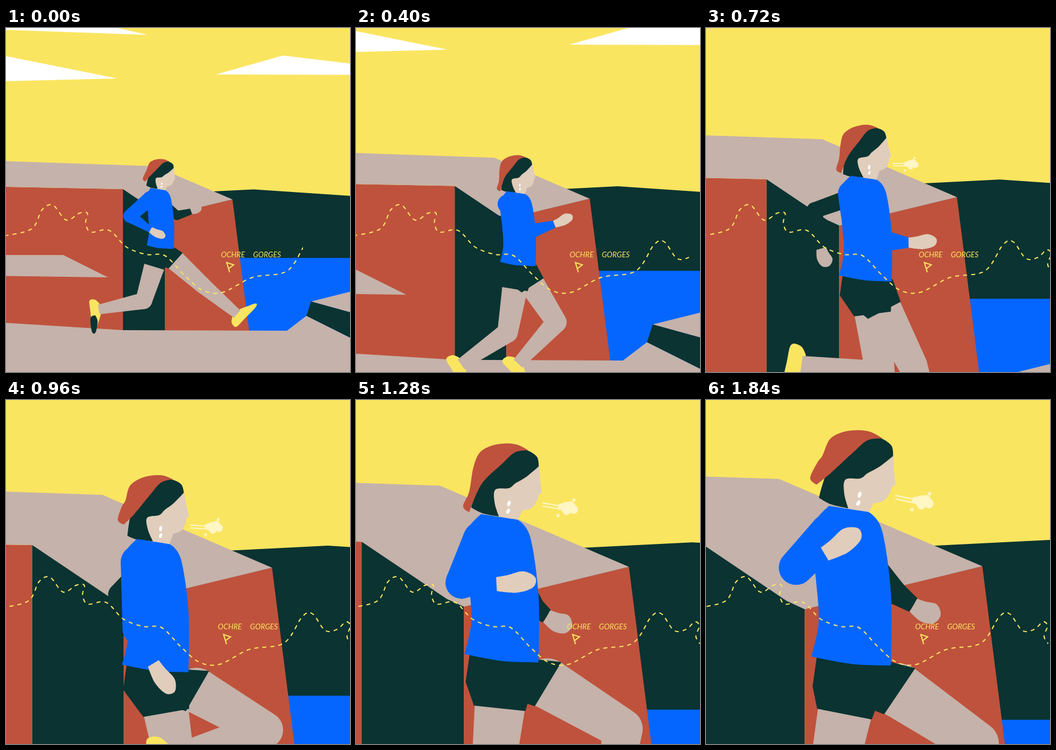
These frames come from a looping animation (600x600 px, 1.88 s). An HTML page with a canvas:

```html
<!DOCTYPE html>
<html lang="en">
<head>
<meta charset="utf-8">
<title>Trail runner</title>
<style>
html, body { margin: 0; width: 100%; height: 100%; overflow: hidden; background: #fae560; }
canvas { display: block; }
</style>
</head>
<body>
<canvas id="stage" width="600" height="600"></canvas>
<script>
const ctx = document.getElementById('stage').getContext('2d');
const YELLOW = '#fae560', WHITE = '#fff', TAN = '#c5b2aa', RED = '#bf523c',
  DARK = '#0a3331', BLUE = '#0466ff', SKIN = '#e0cdbb', BREATH = '#fff6c4';
const LOOP = 1880, STEP = 80;
const RAD = Math.PI / 180;

// Steps at which the key poses are reached, and the tracks through them
const KEYS = [0, 3, 7, 12, 16, 20, 23];
const zoomTrack = [1, 1.085, 1.44, 2.19, 2.44, 2.56, 2.625];
const cliffX = [395, 399, 420, 464, 476, 481.5, 482];
const neckX = [265, 270, 284, 257, 250, 251, 249];
const neckY = [281, 300, 270, 247, 204, 192, 190];
const tilt = [-3, -8, -11, -8, -2, 0, 0];
// Limb angles in degrees: 0 hangs down, positive swings forward
const near = { thigh: [48, 16, -20, 60, 59, 57, 56], shin: [50, -3, -95, -74, -8, 0, 0] };
const far = { thigh: [-17, 22, 35, 10, -6, -9, -11], shin: [-79, -104, 16, -3, -4, -4, -4] };
// Elbow and wrist, measured from the neck
near.arm = [[-49, -13, 29, -13, -27, -32, -35], [47, 57, 57, 70, 47, 42, 39],
  [-13, 27, 67, 0, -2, -12, -16], [71, 55, 43, 97, 48, 35, 30]];
far.arm = [[33, 14, -50, -28, 24, 29, 30], [46, 65, 33, 42, 64, 58, 55],
  [58, 30, -45, -16, 34, 41, 43], [39, 72, 76, 63, 71, 66, 64]];

// Smooth interpolation through a track
function at(track, step) {
  let k = 0;
  while (k < KEYS.length - 2 && step >= KEYS[k + 1]) k++;
  const span = KEYS[k + 1] - KEYS[k], u = (step - KEYS[k]) / span;
  const slope = i => {
    const a = Math.max(0, i - 1), b = Math.min(KEYS.length - 1, i + 1);
    return (track[b] - track[a]) / (KEYS[b] - KEYS[a]) * span;
  };
  const u2 = u * u, u3 = u2 * u;
  return track[k] + (track[k + 1] - track[k]) * (3 * u2 - 2 * u3) +
    slope(k) * (u3 - 2 * u2 + u) + slope(k + 1) * (u3 - u2);
}

// Curve through points; those whose index is in `sharp` are corners
function trace(p, sharp = '', closed = true) {
  const n = p.length / 2;
  const point = i => {
    i = closed ? (i + n) % n : Math.min(n - 1, Math.max(0, i));
    return [p[2 * i], p[2 * i + 1]];
  };
  const handle = (i, dir) => {
    const [x, y] = point(i), a = point(i - 1), b = point(i + 1);
    const pull = sharp.includes((i + n) % n) ? 0 : dir / 6;
    return [x + pull * (b[0] - a[0]), y + pull * (b[1] - a[1])];
  };
  ctx.beginPath();
  ctx.moveTo(...point(0));
  for (let i = 0; i < (closed ? n : n - 1); i++)
    ctx.bezierCurveTo(...handle(i, 1), ...handle(i + 1, -1), ...point(i + 1));
}

function blob(fill, p, sharp) {
  trace(p, sharp);
  ctx.fillStyle = fill;
  ctx.fill();
}

function poly(fill, ...p) {
  ctx.beginPath();
  for (let i = 0; i < p.length; i += 2) ctx.lineTo(p[i], p[i + 1]);
  ctx.fillStyle = fill;
  ctx.fill();
}

function dot(fill, x, y, rx, ry = rx, turn = 0) {
  ctx.beginPath();
  ctx.ellipse(x, y, rx, ry, turn, 0, 7);
  ctx.fillStyle = fill;
  ctx.fill();
}

function within(x, y, scale, turn, draw) {
  ctx.save();
  ctx.translate(x, y);
  ctx.rotate(turn);
  ctx.scale(scale, scale);
  draw();
  ctx.restore();
}

// Tapered limb through [x, y, radius] joints, cut straight at the end
function limb(fill, ...joints) {
  for (let i = 0; i < joints.length - 1; i++) {
    const [x, y, r] = joints[i], [x2, y2, r2] = joints[i + 1];
    const len = Math.hypot(x2 - x, y2 - y), nx = (y - y2) / len, ny = (x2 - x) / len;
    dot(fill, x, y, r);
    poly(fill, x + nx * r, y + ny * r, x2 + nx * r2, y2 + ny * r2,
      x2 - nx * r2, y2 - ny * r2, x - nx * r, y - ny * r);
  }
}

// Drawn around the tip of the cliff; the near rocks also drift to the left
function landscape(step, zoom) {
  const rock = -9.6 * step, ledge = -8.5 * step, hill = -14 / zoom;
  poly(WHITE, -400, -300, -200, -299, -148, -287, -400, -296);
  poly(WHITE, -400, -251, -201, -211, -400, -206);
  poly(WHITE, -29, -218, 88, -251, 280, -228, 280, -217);
  poly(DARK, hill - 60, -12, hill + 51, -17.6, hill + 340, 2, hill + 340, 110, hill - 60, 110);
  poly(BLUE, 0, 102, 320, 102, 320, 260, 0, 260);
  poly(RED, -400, -22, -191, -18, -191, 230, -400, 230);
  poly(DARK, -191, -18, -118, 20, -118, 230, -191, 230);
  poly(RED, 0, 0, 29, 229, -118, 229, -118, 28);
  poly(TAN, -400, -67, -135, -58, 0, 0, -118, 28.5, -130, 23, -191, -18, -400, -22);
  poly(TAN, -500, 97, ledge - 295, 97, ledge - 217, 136, -500, 132);
  poly(TAN, -400, 215, -191, 228, rock + 95, 229, rock + 129, 203, rock + 329, 303, 400, 500, -400, 500);
  poly(TAN, rock + 137, 178, rock + 337, 128, rock + 337, 233);
  poly(DARK, rock + 137, 178, rock + 337, 233, rock + 329, 303, rock + 129, 203);
}

const HIP = [4, 101];

function reach([x, y], degrees, length) {
  return [x + length * Math.sin(degrees * RAD), y + length * Math.cos(degrees * RAD)];
}

function leg(side, step) {
  const thigh = at(side.thigh, step), shin = at(side.shin, step);
  const hem = reach(HIP, thigh, 35), knee = reach(HIP, thigh, 98), ankle = reach(knee, shin, 80);
  within(...ankle, 1, -shin * RAD, () => {
    blob(YELLOW, [-10,-3, -18,3, -18,13, 0,15, 30,17, 35,13, 22,5, 9,-2], '07');
    if (side === far && step < 2) blob(DARK, [9,8, 20,6, 38,13, 36,19, 12,17], '0');
  });
  limb(TAN, [...hem, 18], [...knee, 14.5], [...ankle, 8.5]);
}

function shorts(side, step) {
  const thigh = at(side.thigh, step), hem = reach(HIP, thigh, 36);
  poly(DARK, -21, 97, 29, 102, ...reach(hem, thigh + 90, 18.5), ...reach(hem, thigh - 90, 18.5), -24, 118);
}

function arm(side, step, shoulder, radii, sleeve, skin, length) {
  const [ex, ey, wx, wy] = side.arm.map(track => at(track, step));
  limb(sleeve, [...shoulder, radii[0]], [ex, ey, radii[1]], [wx, wy, 5.2]);
  within(wx, wy, 1, Math.atan2(wy - ey, wx - ex) - 0.1, () => blob(skin,
    [0,-5, length * 0.3,-6, length * 0.7,-8, length,-3, length * 0.92,4, length * 0.5,7, 0,5], '06'));
}

// Drawn around the tip of the nose
function head(step) {
  const tail = 5 + 18 * Math.sin((step - 4) * 0.6);
  blob(SKIN, [-3,-52, -2,-20, 0,0, -6,4, -9,13, -20,27, -37,31, -48,52, -65,60, -90,40, -92,-20, -45,-50], '0267');
  blob(DARK, [-4,-49, -7,-67, -27,-80, -52,-81, -107,-40, -130,22, -110,33, -80,40, -87,15,
    -85,-9, -60,-11, -47,-20, -27,-31], '057');
  blob(RED, [-22,-79, -42,-90, -67,-93, -92,-89, -112,-77, -124,-50, -133,tail - 26, -145,tail,
    -134,tail + 11, -110,-20, -72,-55, -47,-76], '08');
  dot(WHITE, -61, 17, 3, 5.5, 0.3);
  dot(WHITE, -63, 31, 3, 5, 0.5);
  if (step < 9) return;
  ctx.strokeStyle = BREATH;
  ctx.lineWidth = 2.4;
  ctx.beginPath();
  for (const y of [18, 24]) {
    ctx.moveTo(0, y);
    ctx.lineTo(34, y + 7);
  }
  ctx.stroke();
  for (const [x, y, r] of [[43, 28, 10], [51, 27, 10], [34, 26, 6], [57, 32, 8], [44, 35, 7], [58, 15, 3], [28, 42, 3]])
    dot(BREATH, x, y, r);
}

// Drawn around the neck
function runner(step) {
  arm(far, step, [-2, 16], [9, 8], DARK, TAN, 19);
  leg(far, step);
  leg(near, step);
  shorts(far, step);
  shorts(near, step);
  within(0, 0, 1, at(tilt, step) * RAD, () => within(31, -16, 1 / 2.56, 0, () => head(step)));
  // The back of the shirt fills with air as the run gets going
  const flare = 0.78 + 0.22 * Math.min(1, step / 9);
  blob(BLUE, [-13,-2, 13,2, 22,14, 28,56, 28,104, 2,103, -25 * flare,98, -20 * flare,75,
    -22 * flare,45, -25 * flare,14], '0146');
  arm(near, step, [-13, 16], [13, 11.5], BLUE, SKIN, 28);
}

const route = [-30,366, 0,362, 45,350, 63,317, 82,309, 105,335, 128,323, 142,323, 139,340, 148,356,
  180,353, 210,382, 245,395, 277,397, 310,430, 342,457, 378,461, 430,435, 490,424, 522,378,
  540,373, 562,402, 583,400, 598,387, 606,394, 600,412, 607,425];

function map(step) {
  ctx.save();
  ctx.translate(-0.45 * step, 0);
  ctx.strokeStyle = ctx.fillStyle = YELLOW;
  ctx.lineWidth = 2;
  ctx.font = 'italic 13px Lato, sans-serif';
  ctx.fillText('OCHRE', 375, 400);
  ctx.fillText('GORGES', 431, 400);
  ctx.beginPath();
  for (const [x, y] of [[390, 426], [385, 409], [397, 413], [388, 420]]) ctx.lineTo(x, y);
  ctx.stroke();
  // The trail advances to the right
  ctx.beginPath();
  ctx.rect(-40, 0, 558 + 13 * step, 600);
  ctx.clip();
  ctx.setLineDash([7, 7]);
  trace(route, '', false);
  ctx.stroke();
  ctx.restore();
}

const start = performance.now();
function frame() {
  const step = Math.floor((performance.now() - start) % LOOP / STEP);
  const zoom = at(zoomTrack, step);
  ctx.fillStyle = YELLOW;
  ctx.fillRect(0, 0, 600, 600);
  within(at(cliffX, step), 304.5 - 5.5 * zoom, zoom, 0, () => landscape(step, zoom));
  within(at(neckX, step), at(neckY, step), zoom, 0, () => runner(step));
  map(step);
  requestAnimationFrame(frame);
}
frame();
</script>
</body>
</html>
```
